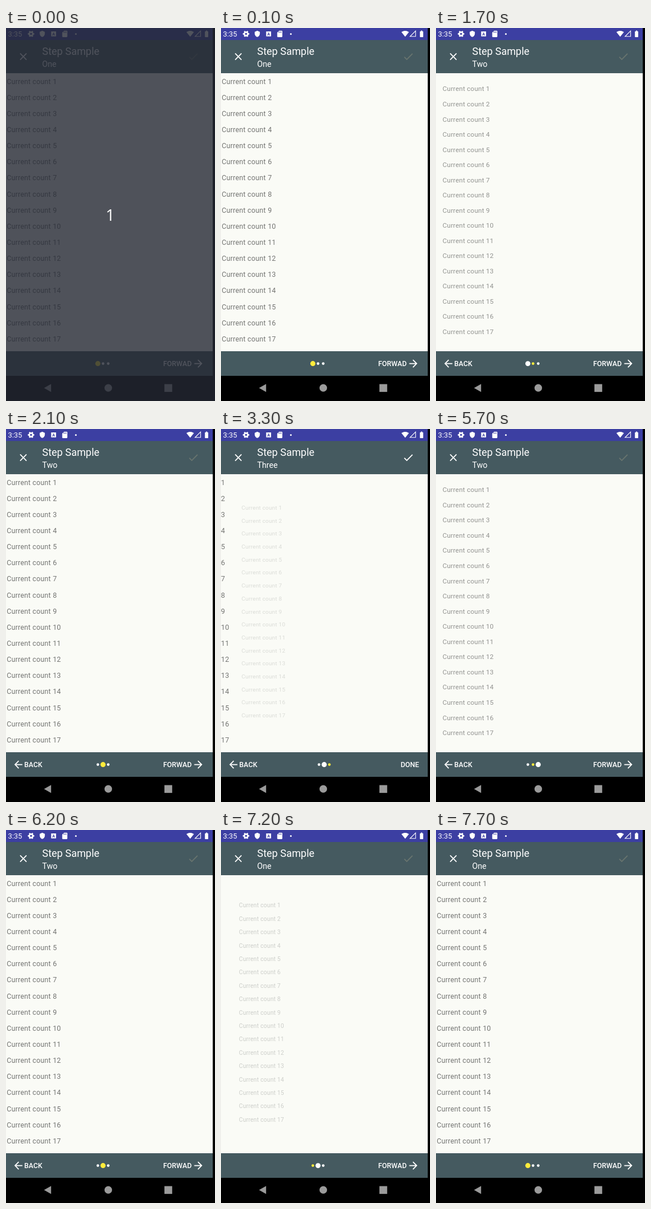
These frames come from a looping animation (367 by 652 pixels, 8000 ms). An HTML page with a canvas:

```html
<!DOCTYPE html>
<html lang="en">
<head>
<meta charset="utf-8">
<title>Step sample</title>
<style>
html, body { margin: 0; width: 100%; height: 100%; overflow: hidden; background: #000; }
canvas { display: block; }
</style>
</head>
<body>
<canvas id="stage" width="367" height="652"></canvas>
<script>
const ctx = document.getElementById('stage').getContext('2d');
const LOOP = 8000, TICK = 100, SLIDE = 200, DOT_TIME = 445;
const WIDTH = 363, TOP = 79, BOTTOM = 565, DP = 0.883;
const BAR = '#455a60', WHITE = '#fff', YELLOW = '#ffeb3b';
const TITLES = ['One', 'Two', 'Three'];
// start time, step left, step entered
const MOVES = [[1649, 0, 1], [3290, 1, 2], [5690, 2, 1], [7160, 1, 0]];

const ICONS = {
  close: 'M19 6.41 17.59 5 12 10.59 6.41 5 5 6.41 10.59 12 5 17.59 6.41 19 12 13.41 17.59 19 19 17.59 13.41 12z',
  check: 'M9 16.17 4.83 12l-1.42 1.41L9 19 21 7l-1.41-1.41z',
  arrow: 'M12 4l-1.41 1.41L16.17 11H4v2h12.17l-5.58 5.59L12 20l8-8z',
  shield: 'M12 1 3 5v6c0 5.5 3.8 10.7 9 12 5.2-1.3 9-6.5 9-12V5z',
  card: 'M18 2h-8L4 8v12c0 1.1.9 2 2 2h12c1.1 0 2-.9 2-2V4c0-1.1-.9-2-2-2z',
  wifi: 'M12 21.5 23.6 7C23.2 6.700 18.800 3 12 3S.8 6.700.4 7z',
  battery: 'M15.700 4H14V2h-4v2H8.300C7.600 4 7 4.600 7 5.300v15.400C7 21.400 7.600 22 8.300 22h7.400c.7 0 1.300-.6 1.300-1.300V5.300C17 4.600 16.400 4 15.700 4z'
};
for (const name in ICONS) ICONS[name] = new Path2D(ICONS[name]);

function rect(x, y, w, h, color) {
  ctx.fillStyle = color;
  ctx.fillRect(x, y, w, h);
}

function circle(x, y, r, color) {
  ctx.fillStyle = color;
  ctx.beginPath();
  ctx.arc(x, y, r, 0, 2 * Math.PI);
  ctx.fill();
}

function poly(points, color) {
  ctx.fillStyle = color;
  ctx.beginPath();
  points.forEach(([x, y]) => ctx.lineTo(x, y));
  ctx.closePath();
  ctx.fill();
}

function text(str, x, y, size, { color = WHITE, weight = 400, spacing = 0, family = 'Roboto' } = {}) {
  ctx.font = `${weight} ${size}px ${family}, sans-serif`;
  ctx.letterSpacing = spacing + 'px';
  ctx.fillStyle = color;
  ctx.fillText(str, x, y);
}

// Icons live in a 24-unit box centred on x, y.
function icon(name, x, y, scale = DP, color = WHITE, flip = 1) {
  ctx.save();
  ctx.translate(x, y);
  ctx.scale(scale * flip, scale);
  ctx.translate(-12, -12);
  ctx.fillStyle = color;
  ctx.fill(ICONS[name]);
  ctx.restore();
}

function gear(x, y, color) {
  ctx.strokeStyle = color;
  ctx.lineWidth = 2.6;
  ctx.beginPath();
  ctx.arc(x, y, 3.1, 0, 2 * Math.PI);
  ctx.stroke();
  ctx.lineWidth = 2.5;
  for (let i = 0; i < 6; i++) {
    const a = i * Math.PI / 3, c = Math.cos(a), s = Math.sin(a);
    ctx.beginPath();
    ctx.moveTo(x + 3.5 * c, y + 3.5 * s);
    ctx.lineTo(x + 5.6 * c, y + 5.6 * s);
    ctx.stroke();
  }
}

function statusBar() {
  const blue = '#3c3fa2';
  rect(0, 0, WIDTH, 21, blue);
  text('3:35', 3.5, 15, 12.9);
  gear(44, 10.3, WHITE);
  icon('shield', 63.7, 10.3, 0.5);
  rect(79.3, 6, 8.6, 8.6, WHITE);
  text('A', 81.2, 13, 7, { color: blue, weight: 700 });
  icon('card', 103.2, 10.3, 0.56);
  rect(101, 6.3, 1, 2, blue);
  rect(103, 6.3, 1, 2, blue);
  rect(105, 6.3, 1, 2, blue);
  circle(122.7, 10.6, 1.5, WHITE);
  icon('wifi', 323.4, 10, 0.56);
  ctx.strokeStyle = WHITE;
  ctx.lineWidth = 1.1;
  ctx.beginPath();
  ctx.moveTo(332, 14.8);
  ctx.lineTo(341.700, 14.8);
  ctx.lineTo(341.700, 5);
  ctx.closePath();
  ctx.stroke();
  icon('battery', 352.2, 10.3, 0.58);
}

function page(offset, scale, alpha) {
  const cx = WIDTH / 2, cy = (TOP + BOTTOM) / 2;
  ctx.save();
  ctx.beginPath();
  ctx.rect(0, TOP, WIDTH, BOTTOM - TOP);
  ctx.clip();
  ctx.globalAlpha = alpha;
  ctx.translate(cx + offset, cy);
  ctx.scale(scale, scale);
  ctx.translate(-cx, -cy);
  for (let i = 0; i < 17; i++)
    text('Current count ' + (i + 1), 1.2, 97.6 + 28.14 * i, 12.36, { color: '#747573', spacing: 0.22 });
  ctx.restore();
}

// Lower page slides left; upper page grows and fades in place. p: 0 = lower, 1 = upper.
function pages(p) {
  if (p < 1) page(-p * WIDTH, 1, 1);
  if (p > 0) page(0, 0.75 + 0.25 * p, p);
}

function dots(from, to, k) {
  const left = to === 2 ? 172.1 : 161.3;
  for (let i = 0; i < 3; i++) {
    const size = (i === from ? 1 - k : 0) + (i === to ? k : 0);
    circle(left + 9.1 * i, 586.6, 2.3 + 2.2 * size, i === to ? YELLOW : WHITE);
  }
}

function bottomBar(from, to, k) {
  const style = { weight: 500 };
  rect(0, BOTTOM, WIDTH, 43, BAR);
  if (to > 0) {
    icon('arrow', 21.7, 586.6, DP, WHITE, -1);
    text('BACK', 32, 591.2, 12.36, style);
  }
  if (to < 2) {
    text('FORWAD', 276, 591.2, 12.36, style);
    icon('arrow', 337.700, 586.6);
  } else {
    text('DONE', 315.4, 591.2, 12.36, style);
  }
  dots(from, to, k);
}

function navBar() {
  const grey = '#9b9b9b';
  poly([[66.8, 629.2], [79.2, 622.2], [79.2, 636.2]], grey);
  circle(179.6, 629.2, 6.6, grey);
  rect(278.2, 622.5, 13.6, 13.6, grey);
}

function draw(now) {
  const t = Math.floor(now % LOOP / TICK) * TICK;
  const [start, from, to] = MOVES.filter(m => m[0] <= t).pop() || [-LOOP, 1, 0];
  const progress = duration => Math.min(1, (t - start) / duration);
  const slide = 1 - (1 - progress(SLIDE)) ** 5;
  const grow = (1 - Math.cos(Math.PI * progress(DOT_TIME))) / 2;

  rect(0, 0, 367, 652, '#000');
  statusBar();
  rect(0, 21, WIDTH, 58, BAR);
  icon('close', 30.4, 50);
  text('Step Sample', 63.6, 47.2, 17.9);
  text(TITLES[to], 63.6, 67.6, 14.13);
  icon('check', 328.9, 50, DP, to === 2 ? WHITE : '#69756f');
  rect(0, TOP, WIDTH, BOTTOM - TOP, '#fafbf6');
  pages(to > from ? slide : 1 - slide);
  bottomBar(from, to, grow);
  navBar();

  if (t < 100) {
    rect(0, 0, 367, 652, 'rgba(37,40,52,.8)');
    text('1', 175, 337, 28, { family: '"Open Sans"' });
  }
}

const begin = performance.now();
function loop() {
  draw(performance.now() - begin);
  requestAnimationFrame(loop);
}
loop();
</script>
</body>
</html>
```
